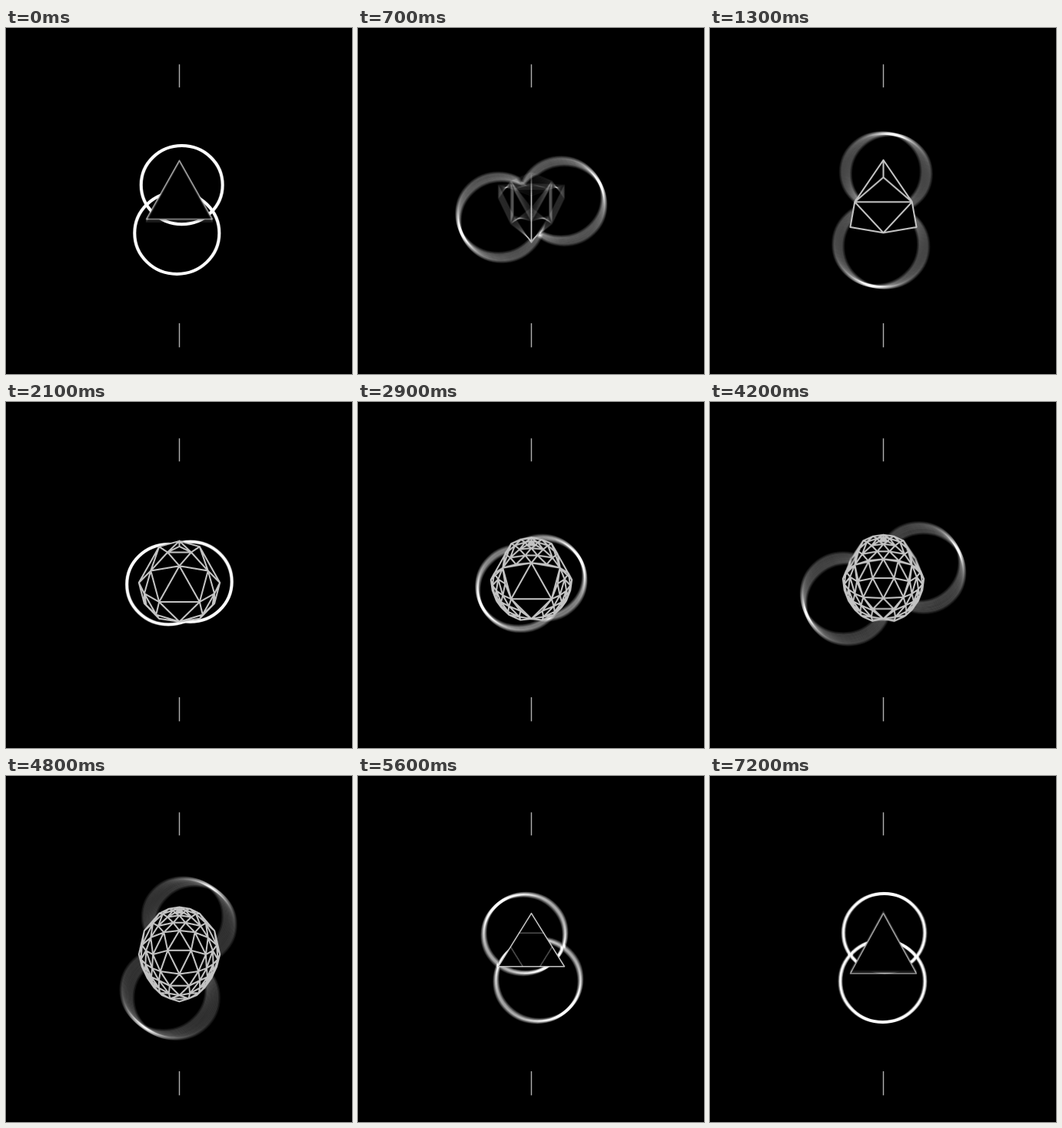
An HTML page with a canvas for the animation above (7300 ms loop, 450 px wide and 450 px high).

```html
<!DOCTYPE html>
<html lang="en">
<head>
<meta charset="utf-8">
<title>Rings and solid</title>
<style>
html, body { margin: 0; width: 100%; height: 100%; overflow: hidden; background: #000; }
canvas { display: block; width: 450px; height: 450px; }
</style>
</head>
<body>
<canvas id="stage" width="450" height="450"></canvas>
<script>
const SIZE = 450, LOOP = 7300, STEP = 100, SAMPLES = 15;
const CX = 225.5, CY = 235.5;
const EDGE = 86, RADIUS = EDGE * Math.sqrt(6) / 4;
const CORNER_CUT = 0.37;

const stage = document.getElementById('stage').getContext('2d');
const layer = document.createElement('canvas');
layer.width = layer.height = SIZE;
const ctx = layer.getContext('2d');

const lerp = (a, b, k) => a + (b - a) * k;
const rad = deg => deg * Math.PI / 180;
const smooth = (t, from, to) => {
  const k = Math.min(1, Math.max(0, (t - from) / (to - from)));
  return k * k * (3 - 2 * k);
};

// Eases from one resting value to the next; stops are [time, value]
const ease = (...stops) => t => stops.reduce(
  (v, [time, to], i) => i ? lerp(v, to, smooth(t, stops[i - 1][0], time)) : to, 0);

// The rings circle each other: five half turns per loop
const orbitAngle = ease([0, 6], [2050, 262], [3600, 548], [5900, 900], [7150, 900], [7300, 906]);
const orbitRadius = ease([0, 31.5], [1200, 49], [2150, 14], [3150, 18], [4250, 54],
  [4700, 54], [5200, 20], [5700, 33], [7300, 31.5]);

const tilt = ease([0, 12], [1200, 325], [2100, 348], [3700, 348], [4800, 355],
  [5500, 332], [7200, 360], [7300, 372]);
const height = ease([0, 227], [1300, 227], [2100, 235], [3600, 228], [4800, 232],
  [5500, 216], [7200, 231], [7300, 227]);
const base = ease([0, 70], [1200, 39], [2900, 66]);
const lean = ease([2900, 0], [3600, 0.35], [4600, -0.2], [5400, 0]);
const keep = t => 1 - smooth(t, 5000, 5500);

function drawRings(t) {
  const angle = rad(orbitAngle(t)), dist = orbitRadius(t);
  const x = dist * Math.sin(angle), y = -dist * Math.cos(angle);
  ctx.strokeStyle = '#fff';
  ctx.lineWidth = 4;
  for (const side of [1, -1]) {
    const r = 54 + side * y * 0.033;
    ctx.beginPath();
    ctx.ellipse(CX + side * x, CY + side * y, r, r * 0.965, 0, 0, Math.PI * 2);
    ctx.stroke();
  }
}

// Tetrahedron with face ABC towards the viewer
const IN = EDGE * Math.sqrt(3) / 6;
const A = [0, 2 * IN, RADIUS / 3];
const B = [-EDGE / 2, -IN, RADIUS / 3];
const C = [EDGE / 2, -IN, RADIUS / 3];
const D = [0, 0, -RADIUS];
const CORNERS = [A, B, C, D];
const TETRA = [[A, B, C], [A, C, D], [A, D, B], [B, D, C]];

const mix = (a, b, k) => a.map((v, i) => lerp(v, b[i], k));

// Point on an edge, drawn towards a corner and puffed out to the sphere
function between(a, b, puff) {
  const atA = CORNERS.includes(a), atB = CORNERS.includes(b);
  const k = atA === atB ? 0.5 : atA ? CORNER_CUT : 1 - CORNER_CUT;
  const m = mix(a, b, k), len = Math.hypot(...m);
  return m.map(v => v * lerp(len, RADIUS, puff) / len);
}

function split(faces, puff) {
  if (puff <= 0) return faces;
  return faces.flatMap(([a, b, c]) => {
    const ab = between(a, b, puff), bc = between(b, c, puff), ca = between(c, a, puff);
    return [[a, ab, ca], [ab, b, bc], [ca, bc, c], [ab, bc, ca]];
  });
}

// The areas around the corners are refined before the face cores
function mesh(t) {
  const puff = (from, to) => smooth(t, from, to) * keep(t);
  const first = split(TETRA, puff(550, 1050));
  if (first === TETRA) return TETRA;
  const refine = (faces, from) =>
    split(split(faces, puff(1500, 1950)), puff(from, from + 500));
  const isCore = f => !f.some(p => CORNERS.includes(p));
  return [
    ...refine(first.filter(f => !isCore(f)), 2500),
    ...refine(first.filter(isCore), 4000)
  ];
}

function projector(t) {
  const sin = Math.sin(rad(tilt(t))), cos = Math.cos(rad(tilt(t)));
  const cy = height(t), floor = cy + base(t), slant = lean(t);
  const stretch = 1.05 + 0.12 * smooth(t, 3800, 4700) * keep(t);
  return ([x, y, z]) => {
    const up = y * cos + z * sin;
    const narrow = 1 - Math.max(0, slant * up / RADIUS);
    return [CX + x * narrow, Math.min(floor, cy - up * stretch)];
  };
}

const isFront = ([p, q, r]) =>
  (q[0] - p[0]) * (r[1] - p[1]) < (q[1] - p[1]) * (r[0] - p[0]);

function drawSolid(t) {
  const project = projector(t);
  ctx.beginPath();
  for (const face of mesh(t)) {
    const flat = face.map(project);
    if (!isFront(flat)) continue;
    flat.forEach((p, i) => i ? ctx.lineTo(...p) : ctx.moveTo(...p));
    ctx.closePath();
  }
  ctx.fillStyle = '#000';
  ctx.fill();
  ctx.strokeStyle = '#bebebe';
  ctx.lineWidth = 1.5 + 0.5 * smooth(t, 550, 1050) * keep(t);
  ctx.lineJoin = 'round';
  ctx.stroke();

  // Last trace of the mesh: cut corners on the front face
  const trace = smooth(t, 5300, 5500) * (1 - smooth(t, 5500, 5900));
  if (trace <= 0) return;
  ctx.beginPath();
  for (const [p, q, r] of [[A, B, C], [B, C, A], [C, A, B]]) {
    ctx.moveTo(...project(mix(p, q, CORNER_CUT)));
    ctx.lineTo(...project(mix(p, r, CORNER_CUT)));
  }
  ctx.strokeStyle = `rgba(255,255,255,${0.32 * trace})`;
  ctx.stroke();
}

function render(time) {
  stage.globalCompositeOperation = 'source-over';
  stage.globalAlpha = 1;
  stage.fillStyle = '#000';
  stage.fillRect(0, 0, SIZE, SIZE);
  stage.globalCompositeOperation = 'lighter';
  stage.globalAlpha = 1 / SAMPLES;
  // Motion blur over one step
  for (let i = 0; i < SAMPLES; i++) {
    const t = (time + STEP * ((i + 0.5) / SAMPLES - 0.5) + LOOP) % LOOP;
    ctx.fillStyle = '#000';
    ctx.fillRect(0, 0, SIZE, SIZE);
    drawRings(t);
    drawSolid(t);
    stage.drawImage(layer, 0, 0);
  }
  stage.globalAlpha = 1;
  stage.fillStyle = '#b0b0b0';
  stage.fillRect(224.8, 47.3, 1.4, 30);
  stage.fillRect(224.8, 384, 1.4, 31.3);
}

const start = performance.now();
let shown = -1;
function tick() {
  const step = Math.floor(Math.max(0, performance.now() - start) % LOOP / STEP);
  if (step !== shown) {
    shown = step;
    render(step * STEP);
  }
  requestAnimationFrame(tick);
}
tick();
</script>
</body>
</html>
```
